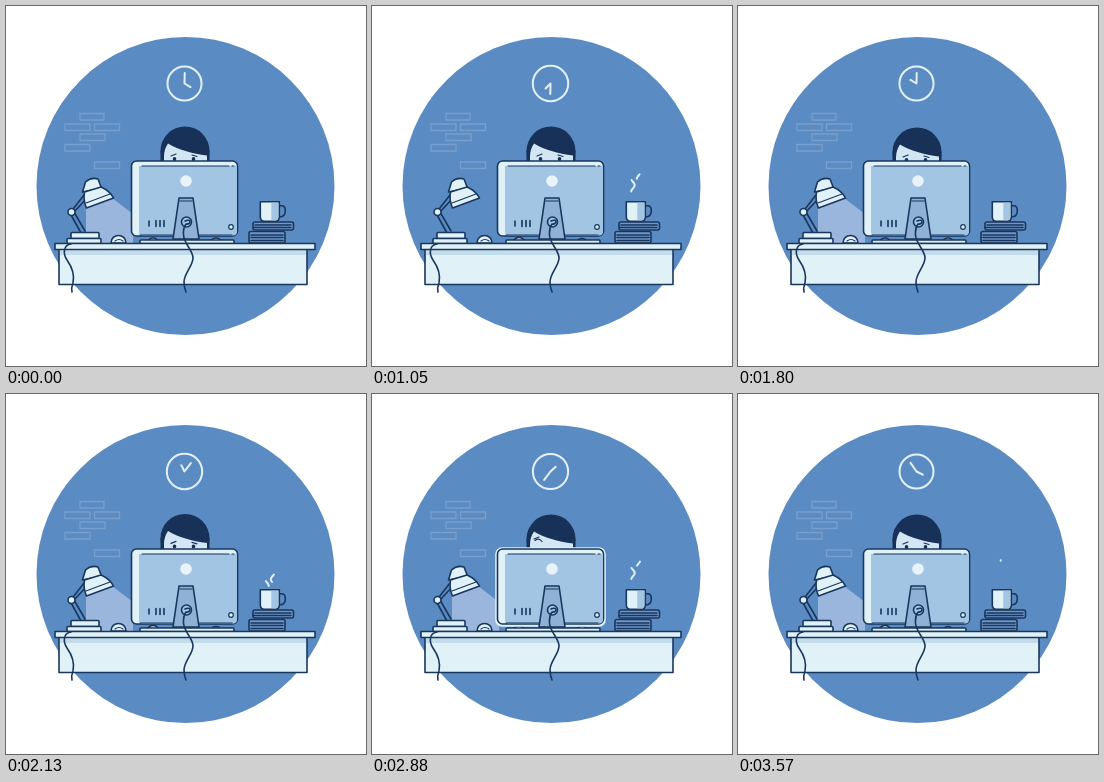
An HTML page for the animation above (3600 ms loop, 360 by 360 pixels).

```html
<!DOCTYPE html>
<html lang="en">
<head>
<meta charset="utf-8">
<title>Late at the desk</title>
<style>
html, body { margin: 0; width: 100%; height: 100%; overflow: hidden; background: #fff; }
svg { display: block; width: 100vw; height: 100vh; }
.ink { stroke: #19365d; stroke-width: 1.6; stroke-linejoin: round; stroke-linecap: round; }
.line { fill: none; }
.pale { fill: #e1f1f8; }
.mid { fill: #a2c5e3; }
.dark { fill: #183158; }
.thin { stroke-width: 1.2; }
.chalk { fill: none; stroke: #e4f0f8; stroke-width: 2; stroke-linecap: round; stroke-linejoin: round; }
</style>
</head>
<body>
<svg viewBox="0 0 360 360">
  <defs>
    <clipPath id="screenClip"><rect x="133" y="155" width="98" height="74.500" rx="4"/></clipPath>
    <clipPath id="headClip"><path d="M140 100H220V157H140Z"/></clipPath>
  </defs>
  <circle cx="179.500" cy="180" r="149" fill="#5b8bc3"/>

  <path class="line" stroke="#799fcc" stroke-width="1.3"
    d="M74 107.500h24v6.500h-24zM59 118h25v6.500h-25zM88.500 118h25v6.500h-25zM74 128h25v6.500h-25zM59 138.500h25v6.500h-25zM88.500 156h25v6.500h-25z"/>

  <circle id="ring" class="chalk" cx="178.500" cy="77.500" r="17"/>
  <path id="hands" class="chalk"/>

  <g clip-path="url(#headClip)">
    <g id="head">
      <circle class="dark" cx="179" cy="144.500" r="24.500"/>
      <path class="dark" d="M154.500 144H203.500V170H154.500Z"/>
      <path fill="#d3e6f4" d="M158 170V150Q158 143 162 137C172 143 186 147 201 149V170Z"/>
      <g id="eyes" class="line ink">
        <path class="thin" d="M165 149.500l5-2M186 148.500l5 1.500"/>
        <g id="open" class="dark" stroke="none"><ellipse cx="168.500" cy="152.500" rx="1.800" ry="2"/><ellipse cx="187.500" cy="152.500" rx="1.800" ry="2"/></g>
        <path id="wink" class="thin" d="M166 151q4-3 7 1"/>
      </g>
    </g>
  </g>

  <path id="beam" fill="#9ab6dd" d="M80 198L106 192L127 208V237H80Z"/>

  <g class="ink pale">
    <path class="line" d="M75 227L64 207L78 189M79 225L68 206L81 192"/>
    <circle cx="65.500" cy="206" r="3.500"/>
    <path d="M76.500 186L79.500 176Q85 171 92 173L95.500 182Z"/>
    <path d="M78.500 186L95 181Q104 185 107.500 192L80.500 202Q77 194 78.500 186Z"/>
    <path class="line thin" d="M80 197L104 188"/>
    <rect x="65" y="226.500" width="28" height="6" rx="1"/>
    <rect x="61" y="232.500" width="34" height="5" rx="1"/>
    <path d="M105 237C105 227 120 227 120 237Z"/>
    <path class="line thin" d="M109 235q4-3 8 0"/>
  </g>

  <g class="ink">
    <g fill="#6f97c8">
      <rect x="247" y="216" width="40.500" height="8" rx="2"/>
      <rect x="243" y="225.500" width="36" height="11.500" rx="2"/>
    </g>
    <path class="line" d="M249 219H285M247 221.500H285M245 229H277M245 231.500H277M245 234.500H277"/>
    <g transform="translate(0.300 0.800)">
      <path class="line" d="M273 199h2.500q3.500 0 3.500 5t-4 6h-2"/>
      <path class="pale" d="M254 195H273V210Q273 214.500 269 214.500H258Q254 214.500 254 210Z"/>
      <path class="mid" stroke="none" d="M265 196H272V210Q272 213.500 269 213.500H265Z"/>
    </g>
  </g>
  <path id="steamA" class="chalk"/>
  <path id="steamB" class="chalk"/>

  <g class="ink">
    <g class="pale">
      <path id="handL" d="M140 237q7-10 14 0z"/>
      <path id="handR" d="M203 237q7-10 14 0z"/>
      <rect x="134" y="234" width="94" height="3.500" rx="1"/>
    </g>
    <rect id="halo" class="pale" style="stroke:#e1f1f8" x="124" y="154" width="109" height="78" rx="6"/>
    <rect class="pale" x="125.500" y="155" width="106" height="75" rx="5"/>
    <path class="mid" stroke="none" clip-path="url(#screenClip)" d="M133 160H231V230H133Z"/>
    <path class="line thin" d="M136 160H223M226 160h2M134 229H226"/>
    <path class="line" d="M143 215v5M150 214.500v6M154 214.500v6M158 214.500v6"/>
    <circle class="pale thin" cx="225" cy="221" r="2.300"/>
    <circle fill="#e9f4fa" stroke="none" cx="180" cy="175" r="5.800"/>
    <path fill="#8fb1d6" d="M173 192H187L193 233H167Z"/>
    <path class="line thin" d="M174 195h12"/>
    <circle fill="#a2c5e3" cx="180.500" cy="216" r="5"/>
  </g>

  <g class="ink pale">
    <rect x="53" y="243" width="248" height="35.500"/>
    <path fill="#c3dcec" stroke="none" d="M54 244H300V249H54Z"/>
    <rect x="49" y="237.500" width="260" height="6"/>
    <path class="line" d="M65 238C57 239 57 248 61 254C66 261 69 268 67 277Q65 282 66 286"/>
    <path class="line" d="M179 215C186 212 185 219 180 218Q177 222 177.500 229C178 238 187 244 187 252C187 260 178 267 178 276Q178 281 180 286"/>
  </g>
</svg>
<script>
const LOOP = 3600;
const el = id => document.getElementById(id);
const set = (id, attrs) => Object.entries(attrs).forEach(([k, v]) => el(id).setAttribute(k, v));
const bump = (t, at, width) => Math.exp(-(((t - at) / width) ** 2));

// Interpolates through [position, value] pairs.
function track(x, keys) {
  let [x0, v0] = keys[0];
  for (const [x1, v1] of keys) {
    if (x <= x1) return x1 === x0 ? v1 : v0 + (v1 - v0) * (x - x0) / (x1 - x0);
    [x0, v0] = [x1, v1];
  }
  return v0;
}

function hand(degrees, length) {
  const a = degrees * Math.PI / 180;
  return `${178.5 + length * Math.sin(a)} ${77.5 - length * Math.cos(a)}`;
}

function steam(id, x, head, tail) {
  let d = '';
  for (let y = tail; y > head; y -= 0.5) d += `${d ? 'L' : 'M'}${x + 1.7 * Math.sin(y * 0.5)} ${y}`;
  set(id, { d });
}

function draw(t) {
  set('hands', { d: `M${hand(t * 1.2, 10.5)}L178.5 77.5L${hand(120 + t * 0.1, 7)}` });
  const alarm = bump(t, 2430, 150);
  const pulse = 2 * bump(t % 1800, 700, 350);
  const mix = (a, b) => a + (b - a) * alarm;
  set('ring', { r: 17 + pulse + alarm * 0.6 });
  el('ring').style.stroke = `rgb(${mix(228, 186)},${mix(240, 128)},${mix(248, 143)})`;
  el('ring').style.strokeWidth = mix(2, 4);
  el('hands').style.stroke = el('ring').style.stroke;
  el('hands').style.strokeWidth = mix(2, 3);

  const turn = bump(t, 2880, 170);
  const bob = track(t, [[0, 0.5], [540, -2.5], [1050, 0.5], [1800, 1.5], [2430, -1.5], [2880, 0.5], [LOOP, 0.5]]);
  set('head', { transform: `translate(0 ${bob})` });
  set('eyes', { transform: `translate(${-3 * turn} ${-5 * turn})` });
  el('open').style.display = turn > 0.5 ? 'none' : '';
  el('wink').style.display = turn > 0.5 ? '' : 'none';

  set('halo', { opacity: Math.max(bump(t, 540, 150), bump(t, 2880, 150)) });
  const tap = Math.sin(t * Math.PI / 90);
  set('handL', { transform: `translate(0 ${tap * 0.7})` });
  set('handR', { transform: `translate(0 ${-tap * 0.7})` });

  el('beam').style.display = t >= 960 && t < 1140 ? 'none' : '';

  const p = t % 1800 / 1800;
  steam('steamA', 261, track(p, [[0.05, 192], [0.3, 182], [0.6, 173.5], [0.9, 166]]),
    track(p, [[0.38, 192], [0.6, 185], [0.985, 166.6], [1, 166]]));
  steam('steamB', 266.5, track(p, [[0, 188], [0.3, 175], [0.58, 168], [0.62, 167]]),
    track(p, [[0.33, 188], [0.58, 173], [0.61, 171], [0.68, 167]]));
}

function tick() {
  draw(performance.now() % LOOP);
  requestAnimationFrame(tick);
}
tick();
</script>
</body>
</html>
```
